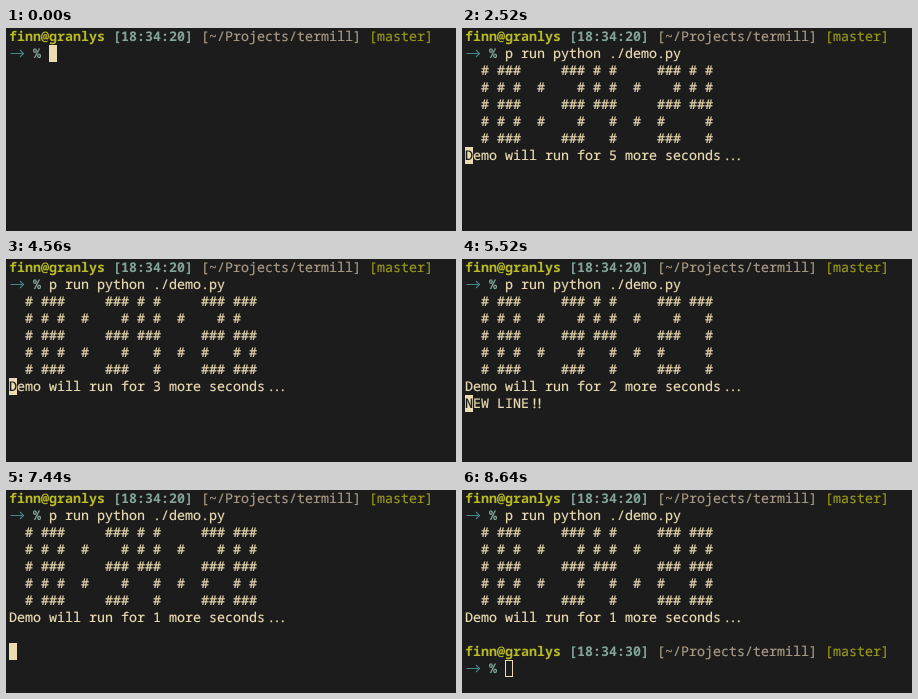
An HTML page for the animation above (8.74 s loop, 450 by 203 pixels).

```html
<!DOCTYPE html>
<html lang="en">
<head>
<meta charset="utf-8">
<title>Terminal clock demo</title>
<style>
html, body { margin: 0; width: 100%; height: 100%; overflow: hidden; background: #1c1c1c; }
svg { display: block; width: 100%; height: 100%; }
text {
  font: 13.3333px "Noto Sans Mono", "DejaVu Sans Mono", monospace;
  white-space: pre;
  text-rendering: geometricPrecision;
  stroke-width: .2px;
}
.bold { font-weight: 700; stroke: none; }
</style>
</head>
<body>
<svg id="screen" viewBox="0 0 450 203"></svg>
<script>
const LOOP = 8740;
const CELL = 8, LINE = 17, LEFT = 3, BASE = 13;
const BG = '#1c1c1c', FG = '#ebdbb2';
const GREEN = '#b8bb26', BLUE = '#83a598', GREY = '#a89984', OLIVE = '#98971a', TEAL = '#458588';

// Five rows per digit, three cells each.
const GLYPHS = {
  1: ['  #', '  #', '  #', '  #', '  #'],
  2: ['###', '  #', '###', '#  ', '###'],
  3: ['###', '  #', '###', '  #', '###'],
  4: ['# #', '# #', '###', '  #', '  #'],
  5: ['###', '#  ', '###', '  #', '###'],
  6: ['###', '#  ', '###', '# #', '###'],
  7: ['###', '  #', '  #', '  #', '  #'],
  8: ['###', '# #', '###', '# #', '###'],
  ':': ['   ', ' # ', '   ', ' # ', '   ']
};

const screen = document.getElementById('screen');
const cellX = col => LEFT + col * CELL;

// One x per character keeps the grid; runs of dots and marks sit closer together.
function text(str, col, row, color = FG, bold = false) {
  const xs = [...str].map((_, i) => cellX(col + i));
  const n = xs.length;
  if (str.endsWith('...')) { xs[n - 3] += 2.3; xs[n - 1] -= 2.3; }
  if (str.endsWith('!!')) { xs[n - 2] += 1.5; xs[n - 1] -= 1.5; }
  return `<text x="${xs.join(' ')}" y="${row * LINE + BASE}" fill="${color}" stroke="${color}"` +
    `${bold ? ' class="bold"' : ''}>${str}</text>`;
}

function prompt(row, time) {
  const y = (row + 1) * LINE + 8.5;
  return text('finn@granlys', 0, row, GREEN, true) +
    text(`[${time}]`, 13, row, BLUE, true) +
    text('[~/Projects/termill]', 24, row, GREY) +
    text('[master]', 45, row, OLIVE) +
    `<path d="M4.5 ${y}H17.5M14 ${y - 3.5}L17.5 ${y}L14 ${y + 3.5}" fill="none" stroke="${TEAL}" stroke-width="1.1"/>` +
    text('%', 3, row + 1, BLUE, true);
}

function cursor(col, row, under = '') {
  return `<rect x="${cellX(col)}" y="${row * LINE}" width="${CELL}" height="${LINE}" fill="${FG}"/>` +
    (under ? text(under, col, row, BG) : '');
}

function hollowCursor(col, row) {
  return `<rect x="${cellX(col) + .5}" y="${row * LINE + .5}" width="${CELL - 1}" height="${LINE - 1}"` +
    ` fill="none" stroke="${FG}"/>`;
}

function clock(time) {
  return [0, 1, 2, 3, 4]
    .map(r => text([...time].map(c => GLYPHS[c][r]).join(' '), 0, r + 2))
    .join('');
}

function demo(second, left) {
  return clock(`18:34:${second}`) + text(`Demo will run for ${left} more seconds...`, 0, 7);
}

const tick = n => demo(24 + n, 5 - n);

const steps = [
  [0, () => cursor(5, 1)],
  [720, () => cursor(27, 1)],
  [1200, () => cursor(0, 2)],
  [2520, () => tick(0) + cursor(0, 7, 'D')],
  [3480, () => tick(1) + cursor(0, 7, 'D')],
  [4560, () => tick(2) + cursor(0, 7, 'D')],
  [5520, () => tick(3) + text('NEW LINE!!', 0, 8) + cursor(0, 8, 'N')],
  [6480, () => tick(4) + cursor(0, 8)],
  [7440, () => tick(4) + cursor(0, 9)],
  [7680, () => tick(4) + prompt(9, '18:34:30') + cursor(5, 10)],
  [8640, () => tick(4) + prompt(9, '18:34:30') + hollowCursor(5, 10)]
];

let shown = -1;

function render(ms) {
  const step = steps.findLastIndex(([at]) => at <= ms);
  if (step === shown) return;
  shown = step;
  screen.innerHTML = prompt(0, '18:34:20') +
    (ms >= 720 ? text('p run python ./demo.py', 5, 1) : '') +
    steps[step][1]();
}

const start = performance.now();

function frame() {
  render((performance.now() - start) % LOOP);
  requestAnimationFrame(frame);
}
frame();
</script>
</body>
</html>
```
